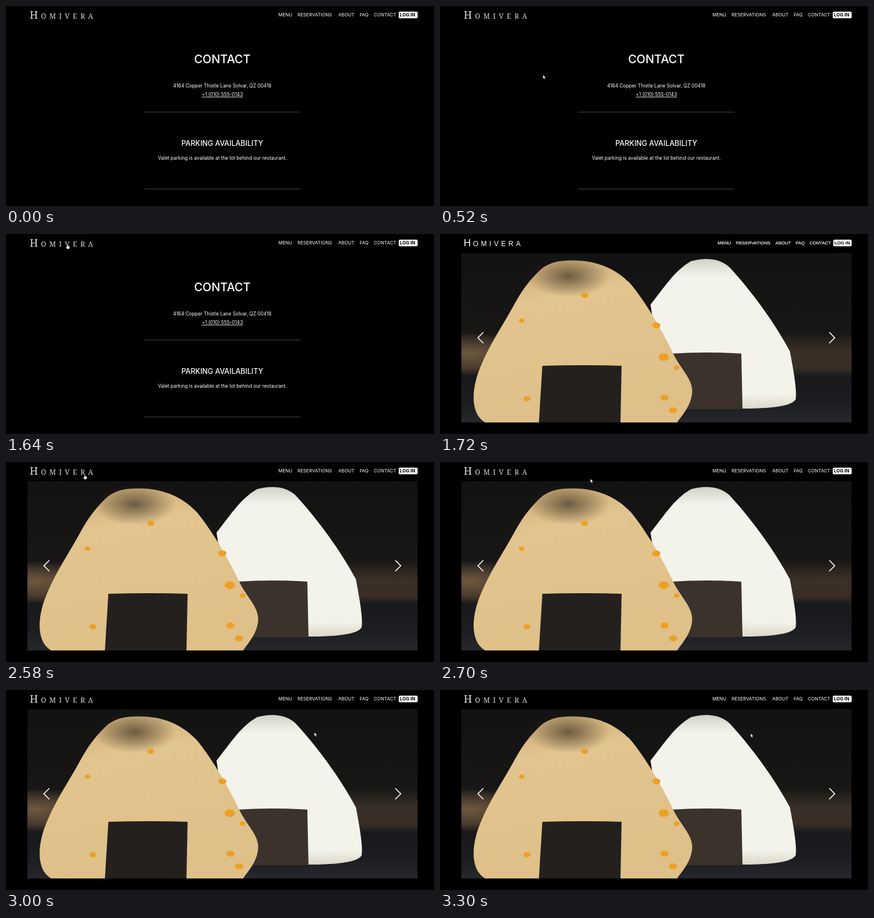
An HTML page that plays this animation: 740 px wide and 346 px high, repeating every 3.32 s.

```html
<!DOCTYPE html>
<html lang="en">
<head>
<meta charset="utf-8">
<title>Restaurant site</title>
<style>
html, body { margin: 0; width: 100%; height: 100%; overflow: hidden; background: #000; }
svg { display: block; width: 740px; height: 346px; }
text { fill: #fff; }
.web { font-family: Inter, sans-serif; }
.plain { font-family: "Liberation Sans", Arial, sans-serif; }
.web .logo { font-family: "Noto Serif", serif; fill: #dcdcdc; }
.nav { font-size: 8px; }
.plain .nav { font-size: 7.8px; stroke: #fff; stroke-width: .2; }
.nav.login { font-weight: 700; fill: #000; stroke: none; }
.page text { text-anchor: middle; font-size: 8.3px; }
.page .title { font-size: 20px; font-weight: 500; }
.page .sub { font-size: 12.5px; font-weight: 500; }
.page .phone { text-decoration: underline; }
.arrow { fill: none; stroke: #fff; stroke-width: 1.6; }
</style>
</head>
<body>
<svg viewBox="0 0 740 346">
  <defs>
    <linearGradient id="room" x2="0" y2="1">
      <stop offset="0" stop-color="#121212"/>
      <stop offset=".47" stop-color="#181715"/>
      <stop offset=".58" stop-color="#3a3027"/>
      <stop offset=".68" stop-color="#382e25"/>
      <stop offset=".73" stop-color="#18191b"/>
      <stop offset=".88" stop-color="#1c1d21"/>
      <stop offset="1" stop-color="#27282c"/>
    </linearGradient>
    <linearGradient id="gold" x2=".25" y2="1">
      <stop offset="0" stop-color="#c9a672"/>
      <stop offset=".3" stop-color="#e2c48e"/>
      <stop offset="1" stop-color="#dfc089"/>
    </linearGradient>
    <linearGradient id="white" x2="0" y2="1">
      <stop offset="0" stop-color="#d2d1c9"/>
      <stop offset=".12" stop-color="#f3f3ec"/>
      <stop offset=".9" stop-color="#f3f3ea"/>
      <stop offset="1" stop-color="#dcd7c8"/>
    </linearGradient>
    <radialGradient id="seed">
      <stop offset="0" stop-color="#33291c" stop-opacity=".65"/>
      <stop offset="1" stop-color="#33291c" stop-opacity="0"/>
    </radialGradient>
    <radialGradient id="glow">
      <stop offset="0" stop-color="#6d5740"/>
      <stop offset="1" stop-color="#6d5740" stop-opacity="0"/>
    </radialGradient>
    <clipPath id="frame"><rect x="37" y="33" width="674.5" height="293"/></clipPath>
  </defs>

  <g id="contact" class="page web">
    <text class="title" x="374" y="99">CONTACT</text>
    <text x="374" y="140.5">4164 Copper Thistle Lane Solvar, QZ 00418</text>
    <text class="phone" x="374" y="156">+1 (010) 555-0143</text>
    <path d="M239 183.5H509M239 316.5H509" stroke="#444"/>
    <text class="sub" x="374" y="242">PARKING AVAILABILITY</text>
    <text x="374" y="265.5">Valet parking is available at the lot behind our restaurant.</text>
  </g>

  <g id="home">
    <g clip-path="url(#frame)">
      <rect x="37" y="33" width="675" height="293" fill="url(#room)"/>
      <ellipse cx="50" cy="207" rx="100" ry="36" fill="url(#glow)"/>
      <path fill="url(#white)" d="M364 122C384 98 404 64 434 47C458 40 484 42 500 57C545 106 582 160 605 203C612 240 617 270 615 286C607 300 560 302 522 302H425L380 230Z"/>
      <path fill="#3b332b" d="M400 207Q460 203 521 207L523 303H425Z"/>
      <path fill="url(#gold)" d="M78 326C54 312 54 275 66 240C84 192 108 160 130 119C145 92 160 74 177 59C194 46 218 45 238 46C276 47 310 64 331 88C352 114 375 150 400 200C413 232 437 248 436 274C434 298 418 314 410 326Z"/>
      <ellipse cx="222" cy="73" rx="72" ry="36" fill="url(#seed)"/>
      <g id="bits" fill="#eda025"></g>
      <path fill="#23201e" d="M177 228Q245 226 314 228L312 326H171Z"/>
    </g>
    <path class="arrow" d="M75 170L65.5 179.5L75 189M673 170L682.5 179.5L673 189"/>
  </g>

  <g id="web" class="web"></g>
  <g id="plain" class="plain"></g>

  <g id="pointer" fill="#fff" stroke="#111" stroke-width=".6">
    <path id="tip" d="M0 0V7L1.6 5.6L2.8 8L4 7.4L2.9 5.1H5Z"/>
    <path id="hand" d="M-.8 .7Q0-.6 .8 .7V3.2L3.6 4Q4.4 4.3 4.2 5.4L3.5 9H-.5L-2.8 5.8Q-2.6 4.6-.8 5.6Z"/>
  </g>
</svg>

<script>
const LOOP = 3320, HOME = 1720, FONTS_READY = 2580;
const LABELS = ["MENU", "RESERVATIONS", "ABOUT", "FAQ", "CONTACT"];
const $ = id => document.getElementById(id);

function add(parent, tag, attrs, text = "") {
  const el = document.createElementNS("http://www.w3.org/2000/svg", tag);
  for (const key in attrs) el.setAttribute(key, attrs[key]);
  el.textContent = text;
  parent.append(el);
}

function header(group, logo, xs, box) {
  add(group, "text", { class: "logo", x: 41, y: logo.y, "font-size": logo.big }, "H");
  add(group, "text", { class: "logo", x: logo.x, y: logo.y, "font-size": 12, "letter-spacing": logo.gap }, "OMIVERA");
  LABELS.forEach((label, i) => add(group, "text", { class: "nav", x: xs[i], y: 18.3 }, label));
  add(group, "rect", { x: box, y: 9.7, width: 711.7 - box, height: 11.6, rx: 2, fill: "#fff" });
  add(group, "text", { class: "nav login", x: box + 2, y: 18.3 }, "LOG IN");
}

header($("web"), { x: 60.5, y: 22, big: 18, gap: 5.6 }, [471, 504, 574.5, 611.5, 636], 679);
header($("plain"), { x: 57, y: 21.2, big: 17, gap: 4.5 }, [480, 511.5, 580, 615, 639], 680);

// x, y, radius of the orange pieces
[[387, 213, 9], [374, 158, 7], [250, 106, 6], [388, 283, 7], [403, 305, 7], [150, 285, 6], [141, 150, 5], [409, 231, 5]]
  .forEach(([cx, cy, rx]) => add($("bits"), "ellipse", { cx, cy, rx, ry: rx * 0.75 }));

// time, x, y of the pointer's hot spot
const ENTER = [[120, 300, 329], [420, 214, 170], [720, 106, 17]];
const LEAVE = [[2580, 136, 21], [2700, 260, 29], [2860, 482, 52], [3000, 533, 73], [3240, 533, 73], [3300, 537, 75]];

function along(path, t) {
  const i = path.findIndex(p => p[0] > t);
  if (i < 0) return path[path.length - 1].slice(1);
  const [a, b] = [path[i - 1], path[i]];
  const k = (t - a[0]) / (b[0] - a[0]);
  return [a[1] + (b[1] - a[1]) * k, a[2] + (b[2] - a[2]) * k];
}

const show = (id, on) => { $(id).style.display = on ? "" : "none"; };

function draw(t) {
  const home = t >= HOME;
  const fallback = home && t < FONTS_READY;
  show("contact", !home);
  show("home", home);
  show("plain", fallback);
  show("web", !fallback);

  const visible = t >= 120 && !fallback;
  show("pointer", visible);
  if (!visible) return;
  const [start, step] = home ? [FONTS_READY, 20] : [120, 100];
  const held = start + Math.floor((t - start) / step) * step;
  const [x, y] = along(home ? LEAVE : ENTER, held);
  const overLogo = y < 25 && x < 152;
  $("pointer").setAttribute("transform", `translate(${x} ${y})`);
  show("hand", overLogo);
  show("tip", !overLogo);
}

const begin = performance.now();
function tick() {
  draw((performance.now() - begin) % LOOP);
  requestAnimationFrame(tick);
}
tick();
</script>
</body>
</html>
```
